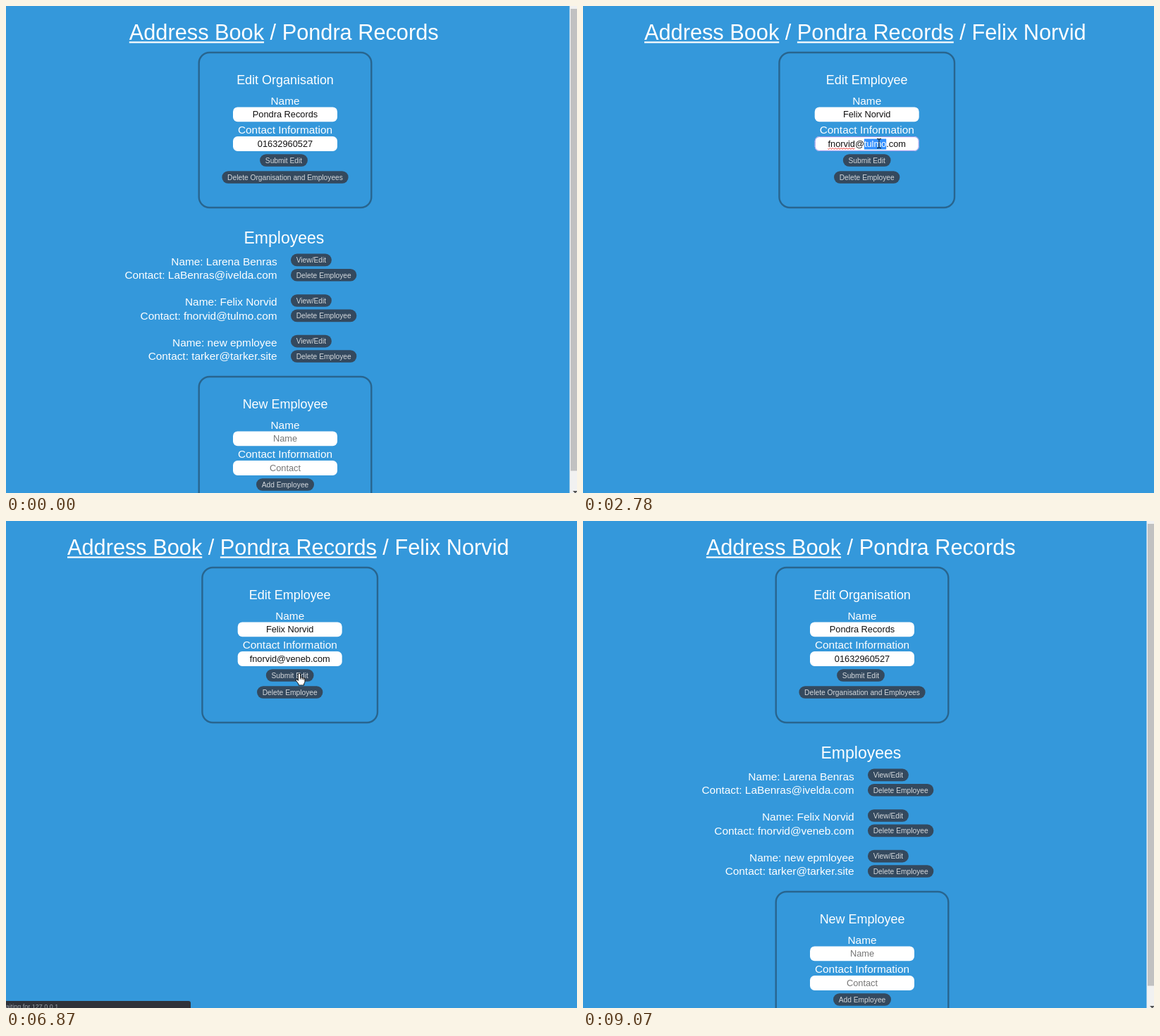
An HTML page with a canvas that plays this animation: 810x691 px, repeating every 9590 ms.

```html
<!DOCTYPE html>
<html lang="en">
<head>
<meta charset="utf-8">
<title>Address book</title>
<style>
  html, body { margin: 0; width: 100%; height: 100%; overflow: hidden; background: #3498db; }
  canvas { display: block; }
</style>
</head>
<body>
<canvas width="810" height="691"></canvas>
<script>
const ctx = document.querySelector('canvas').getContext('2d');
const LOOP = 9590;
const BLUE = '#3498db', SLATE = '#34495e', EDGE = '#28658f';
const ORG = 'Pondra Records', PERSON = 'Felix Norvid', USER = 'fnorvid';
const OLD_HOST = 'tulmo', NEW_HOST = 'veneb';

const OPEN_EDIT = 1720, FOCUS = 2630, SELECT = 2780, BLUR = 6570, GO_BACK = 8090;
// [time, number of letters of the new host typed]
const KEYS = [[3450, 0], [4500, 1], [4650, 2], [4750, 3], [5450, 4], [5580, 5]];
// [shown, fade start, fade end]
const LOADING = [[1700, 1960, 2200], [6870, 7100, 7300], [8040, 8150, 8350]];
// [time, x, y, easing into this point]
const linear = u => u;
const easeOut = u => 1 - (1 - u) ** 2;
const smooth = u => u * u * (3 - 2 * u);
const PATH = [
  [600, 775, 690, linear], [1020, 455, 381, easeOut], [1420, 446, 414, smooth],
  [1910, 446, 414, linear], [2010, 447, 343, linear], [2480, 420, 195, easeOut],
  [6070, 420, 195, linear], [6390, 416, 216, smooth], [7100, 416, 216, linear],
  [7650, 467, 20, smooth], [7830, 457, 34, smooth], [7940, 457, 34, linear],
  [8040, 459, 36, smooth], [8110, 459, 36, linear], [9070, 752, 672, smooth]
];

let hot = [];   // areas that change the pointer, rebuilt with every picture

function setFont(size) { ctx.font = `${size}px "Liberation Sans", Arial, sans-serif`; }

function text(str, x, y, size, color = '#fff', align = 'center') {
  setFont(size);
  ctx.textAlign = align;
  ctx.fillStyle = color;
  ctx.fillText(str, x, y);
  return ctx.measureText(str).width;
}

function box(x, y, w, h, r, color) {
  ctx.beginPath();
  ctx.roundRect(x, y, w, h, r);
  ctx.fillStyle = color;
  ctx.fill();
}

function hotArea(x, y, w, h, kind) { hot.push({ x, y, w, h, kind }); }

// x is the centre, or the left edge when fromLeft is set
function button(label, x, y, fromLeft) {
  setFont(10.24);
  const w = ctx.measureText(label).width + 15.4;
  const left = fromLeft ? x : x - w / 2;
  box(left, y - 8.8, w, 17.6, 8.7, SLATE);
  text(label, left + w / 2, y + 3.7, 10.24, '#d5d9dd');
  hotArea(left, y - 8.8, w, 17.6, 'hand');
}

function input(cx, y, value, color) {
  box(cx - 74, y, 148, 20.8, 6.5, '#fff');
  text(value, cx, y + 14.6, 12.8, color);
  hotArea(cx - 74, y, 148, 20.8, 'beam');
}

function card(cx, w, dy, heading, values, color) {
  ctx.beginPath();
  ctx.roundRect(cx - w / 2 + 1.2, 66 + dy, w - 2.4, 220, 15);
  ctx.strokeStyle = EDGE;
  ctx.lineWidth = 2.4;
  ctx.stroke();
  text(heading, cx, 111 + dy, 17.97);
  text('Name', cx, 139.6 + dy, 15.36);
  input(cx, 143.4 + dy, values[0], color);
  text('Contact Information', cx, 181 + dy, 15.36);
  input(cx, 185.1 + dy, values[1], color);
}

function breadcrumb(x, links, last) {
  for (const link of links) {
    const w = text(link, x, 48, 30.72, '#fff', 'left');
    ctx.fillRect(x, 50.4, w, 2.2);
    hotArea(x, 20, w, 35, 'hand');
    x += w;
    x += text(' / ', x, 48, 30.72, '#fff', 'left');
  }
  text(last, x, 48, 30.72, '#fff', 'left');
}

function organisationPage(host) {
  breadcrumb(174.8, ['Address Book'], ORG);
  card(396, 247, 0, 'Edit Organisation', [ORG, '01632960527'], '#111');
  button('Submit Edit', 394, 219);
  button('Delete Organisation and Employees', 396, 243);
  text('Employees', 394.4, 337, 23.04);
  const people = [
    ['Larena Benras', 'LaBenras@ivelda.com'],
    [PERSON, `${USER}@${host}.com`],
    ['new epmloyee', 'tarker@tarker.site']
  ];
  people.forEach(([name, contact], i) => {
    const y = i * 57.6;
    text('Name: ' + name, 384.6, 367.8 + y, 15.36, '#fff', 'right');
    text('Contact: ' + contact, 384.6, 387 + y, 15.36, '#fff', 'right');
    button('View/Edit', 404, 360.4 + y, true);
    button('Delete Employee', 404, 381.8 + y, true);
  });
  card(396, 247, 460, 'New Employee', ['Name', 'Contact'], '#757575');
  button('Add Employee', 396, 679);
  scrollbar();
}

function scrollbar() {
  box(799.5, 0, 11, 691, 0, '#f1f1f1');
  box(801, 4, 9, 655.5, 0, '#c1c1c1');
  ctx.beginPath();
  ctx.moveTo(804, 688);
  ctx.lineTo(811, 688);
  ctx.lineTo(807.5, 691.5);
  ctx.fillStyle = '#505050';
  ctx.fill();
}

function employeePage(t) {
  const key = KEYS.filter(k => k[0] <= t).pop();
  const host = key ? NEW_HOST.slice(0, key[1]) : OLD_HOST;
  const contact = `${USER}@${host}.com`;
  breadcrumb(87, ['Address Book', ORG], PERSON);
  card(402.7, 251, 0, 'Edit Employee', [PERSON, contact], '#111');
  button('Submit Edit', 402.7, 219);
  button('Delete Employee', 402.7, 243);
  if (t >= FOCUS && t < BLUR) editing(t, contact, host, key);
}

function editing(t, contact, host, key) {
  setFont(12.8);
  const width = s => ctx.measureText(s).width;
  const left = 402.7 - width(contact) / 2;
  const hostLeft = left + width(USER + '@');
  ctx.beginPath();
  ctx.roundRect(329.2, 185.6, 147, 19.8, 6);
  ctx.strokeStyle = '#8f8fe8';
  ctx.lineWidth = 1;
  ctx.stroke();
  if (t >= SELECT) squiggle(left, left + width(USER));
  if (!key && t >= SELECT) {
    box(hostLeft, 188.5, width(host), 15, 0, '#3390ff');
    text(host, hostLeft, 199.7, 12.8, '#fff', 'left');
    return;
  }
  const since = t - (key ? key[0] : FOCUS);
  if (since % 1000 < 490) {
    const before = key ? host : host.slice(0, 3);
    box(hostLeft + width(before) + 0.3, 188.5, 1, 14.5, 0, '#111');
  }
}

function squiggle(from, to) {
  ctx.beginPath();
  for (let x = from; x < to; x += 1) ctx.lineTo(x, 202.4 + Math.sin((x - from) * 1.6) * 0.9);
  ctx.strokeStyle = '#f03030';
  ctx.lineWidth = 1;
  ctx.stroke();
}

function statusBar(t) {
  for (const [start, fade, end] of LOADING) {
    if (t < start || t >= end) continue;
    ctx.globalAlpha = Math.min(1, (end - t) / (end - fade));
    box(-4, 681, 266, 16, 3, '#2f3239');
    text('Waiting for 127.0.0.1...', -8.5, 692, 9, '#a0a5ab', 'left');
    ctx.globalAlpha = 1;
  }
}

const SHAPES = {
  arrow: new Path2D('M0 0V13L3 10.3L5.1 15L7.2 14L5.2 9.5H9Z'),
  hand: new Path2D('M-1.6 1Q0-1 1.5 1V6Q3 4.8 4 6.4Q5.4 5.4 6.2 7Q8 6.2 8 8.4V11.5Q8 13.5 6.6 15V17H-1V15.3L-4.8 10.2Q-5.2 8 -3 8.7L-1.6 10.4Z'),
  beam: new Path2D('M-3-6.5H-1L0-5.8L1-6.5H3M0-5.8V5.8M-3 6.5H-1L0 5.8L1 6.5H3')
};

function pointer(t) {
  const i = PATH.findIndex(p => p[0] > t);
  if (i < 1) return;
  const [t0, x0, y0] = PATH[i - 1], [t1, x1, y1, ease] = PATH[i];
  const u = ease((t - t0) / (t1 - t0));
  const x = x0 + (x1 - x0) * u, y = y0 + (y1 - y0) * u;
  const area = hot.find(a => x >= a.x && x <= a.x + a.w && y >= a.y && y <= a.y + a.h);
  const kind = area ? area.kind : 'arrow';
  ctx.save();
  ctx.translate(x, y);
  ctx.lineWidth = 1;
  ctx.lineJoin = 'round';
  ctx.strokeStyle = '#111';
  ctx.fillStyle = '#fff';
  if (kind !== 'beam') ctx.fill(SHAPES[kind]);
  ctx.stroke(SHAPES[kind]);
  if (kind === 'hand') ctx.stroke(new Path2D('M1.5 5V8.5M4 6.4V9M6.2 7V9.4'));
  ctx.restore();
}

function draw(now) {
  const t = now % LOOP;
  hot = [];
  box(0, 0, 810, 691, 0, BLUE);
  if (t < OPEN_EDIT) organisationPage(OLD_HOST);
  else if (t < GO_BACK) employeePage(t);
  else organisationPage(NEW_HOST);
  statusBar(t);
  pointer(t);
  requestAnimationFrame(draw);
}

const begin = performance.now();
(function frame() {
  requestAnimationFrame(frame.bind(null));
}).length;
draw(0);
</script>
</body>
</html>
```
